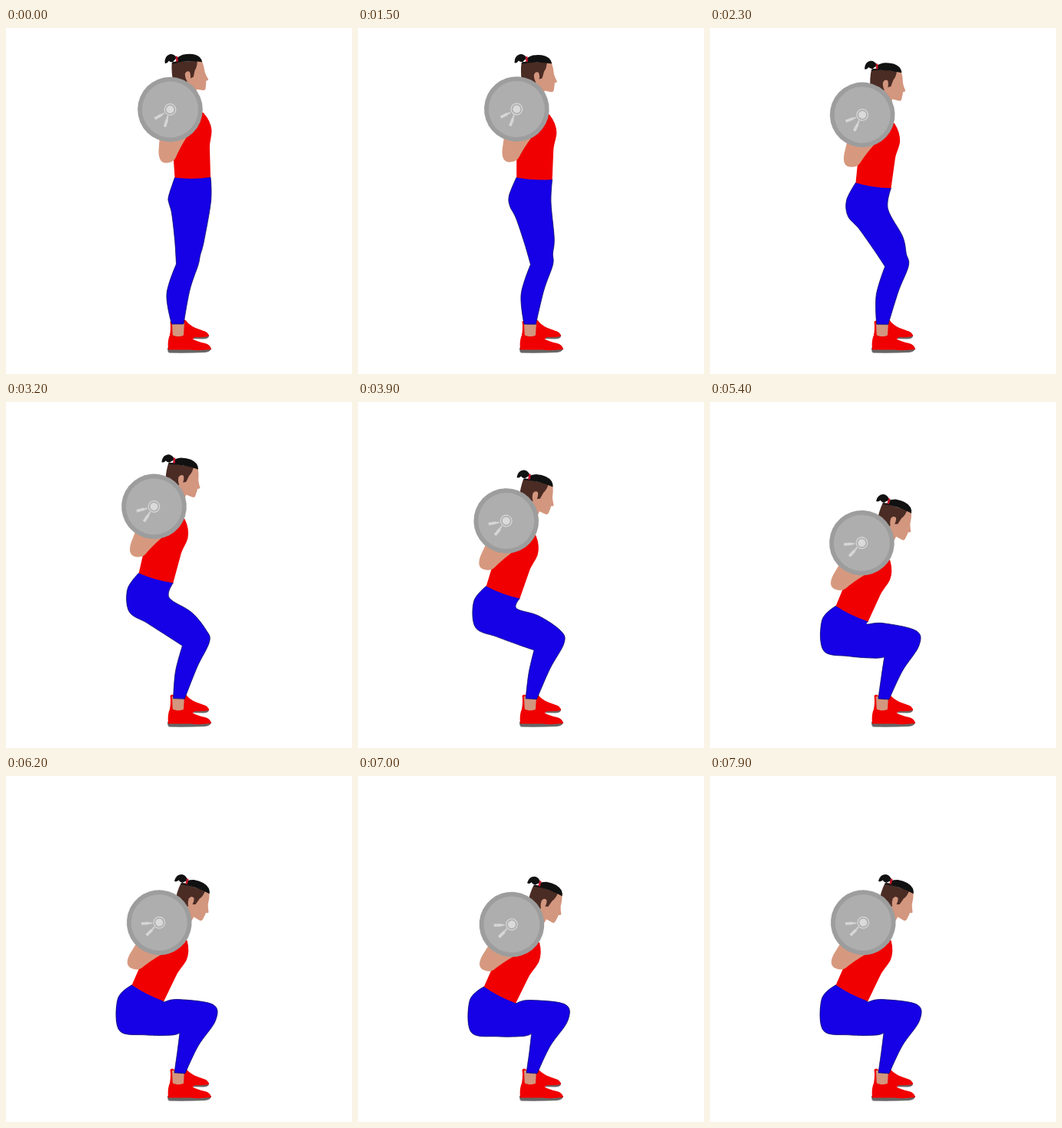
Animation of 450x450 px, one loop 8 s. Source, as an HTML page:

```html
<!DOCTYPE html>
<html lang="en">
<head>
<meta charset="utf-8">
<title>Barbell squat</title>
<style>
  html, body { margin: 0; width: 100%; height: 100%; overflow: hidden; background: #fff; }
  svg { display: block; width: 100vw; height: 100vh; }
</style>
</head>
<body>
<svg viewBox="0 0 450 450">
  <g id="feet">
    <path fill="#666" d="M236 399L264 399Q265 404 257 404.500L236 404Z"/>
    <path fill="#f00000" d="M213.500 382Q216 379 219 382L219 404L212 404Q215 392 213.500 382ZM230 379Q234 379 236 383Q241 388 249 391L260 395Q264 398 264 401Q255 403 246 402L242 405L230 404Z"/>
    <path fill="#d3967e" d="M216 383L232 383L231 399L236 404L217 404Z"/>
    <path fill="#666" d="M210 416L267 416Q267 421 259 422Q236 423 212 422.500Q210 421 210 416Z"/>
    <path fill="#f00000" d="M212 402Q214 398 218 400Q226 403 232 399Q237 400 242 404Q249 408 259 410Q266 412 267 418Q250 420 240 418.500L211 418.500Q210 409 212 402Z"/>
  </g>
  <path id="legs" fill="#1600e6" stroke="#0c0868" stroke-width=".8" stroke-linejoin="round"/>
  <g id="upper">
    <path fill="#f00000" d="M6 88.500Q28 91.500 52.500 88L51.500 52C51 42 54 36 54 27Q53 15 43 4L0 0Z"/>
    <g id="head">
      <path fill="#d3967e" d="M15 -12Q18 -5 19 3Q21 8 23.500 12Q23 14 20.500 14L20.500 18Q20 20 20 23Q20 27 15 26L8 25L6 40L-15 40L-15 0L0 -12Z"/>
      <path fill="#4a2c24" d="M-24 -10L9 -12Q9 -4 6 0L4 9L-1 11L-6 17L-22 17Q-25 2 -24 -10Z"/>
      <path fill="#d3967e" d="M-7 5Q-5 0 -1 2Q1 6 0 12L-2 17L-5 13Q-7 9 -7 5Z"/>
      <path fill="#111" d="M-24 -8Q-20 -16 -10 -20Q5 -23 12 -17Q15 -14 15.500 -10.500Q-5 -13 -24 -8ZM-17 -16Q-22 -22 -27 -20.500Q-34 -18 -33 -9Q-30 -8 -28 -12Q-25 -9 -17 -12Z"/>
      <path stroke="#c4142a" stroke-width="2.6" d="M-18 -18L-17 -11"/>
    </g>
    <path fill="#d6997f" d="M-13.500 33L-15 54Q-15 69.500 -5.500 69.500Q4 69 7 63Q12 51 22 35Z"/>
    <circle r="42.300" fill="#9d9d9d"/>
    <circle r="36.500" fill="#aeaeae"/>
    <g stroke="#d6d6d6" fill="none">
      <path stroke-width="2" d="M-8 5L-13 8M-3 8L-4.500 15"/>
      <path stroke-width="3.600" d="M-11.500 7L-20 12M-4 13L-7 22.500"/>
      <circle r="7.300" stroke-width="1.300"/>
    </g>
    <circle r="5" fill="#dadada"/>
  </g>
</svg>
<script>
const LOOP = 8000, STEP = 100, DEEPEST = 7050;
// Depth of the squat over time: 0 standing, 1 thighs level.
const depthKeys = [[0, 0], [1500, 0.145], [2300, 0.345], [3200, 0.61], [4600, 0.87], [6200, 1], [DEEPEST, 1.015]];

// Slope at a key, weighted by the neighbouring spans; the ends are at rest.
function slope(i) {
  if (i === 0 || i === depthKeys.length - 1) return 0;
  const [[t0, d0], [t1, d1], [t2, d2]] = depthKeys.slice(i - 1, i + 2);
  const a = t1 - t0, b = t2 - t1;
  return ((d1 - d0) / a * b + (d2 - d1) / b * a) / (a + b);
}

function depthAt(time) {
  const t = DEEPEST - Math.abs(time - DEEPEST);
  const j = depthKeys.findIndex(([end]) => end > 0 && t <= end), i = j - 1;
  const [[t0, d0], [t1, d1]] = [depthKeys[i], depthKeys[j]];
  const span = t1 - t0, s = (t - t0) / span, r = 1 - s;
  return d0 * (1 + 2 * s) * r * r + d1 * s * s * (3 - 2 * s)
    + span * s * r * (slope(i) * r - slope(j) * s);
}

const add = ([x, y], [dx, dy]) => [x + dx, y + dy];

function turn([x, y], degrees) {
  const a = degrees * Math.PI / 180, c = Math.cos(a), s = Math.sin(a);
  return [x * c - y * s, x * s + y * c];
}

const sharp = ([x, y]) => [x, y, true];

// Smooth closed outline that keeps sharp points as corners.
function outline(pts) {
  const n = pts.length;
  const at = i => pts[(i + n) % n].slice(0, 2);
  const handle = (i, sign) => pts[i][2] ? at(i)
    : at(i).map((c, k) => c + sign * (at(i + 1)[k] - at(i - 1)[k]) / 6);
  const curves = pts.map((_, i) => `C${handle(i, 1)} ${handle((i + 1) % n, -1)} ${at(i + 1)}`);
  return `M${at(0)}${curves.join("")}Z`;
}

const byId = id => document.getElementById(id);

function draw(time) {
  const d = depthAt(time), fold = d * d;
  const lean = 27.5 * d, swing = -83 * d;

  const knee = [235.5 + 14 * Math.sin(d * Math.PI / 2), 307 + 18 * fold];
  const onKnee = (x, y) => add(knee, [x, y]);
  const onThigh = (x, y) => add(knee, turn([x, y], swing));
  const hip = onThigh(4.5 * (1 - 0.055 * d), -87 * (1 - 0.055 * d));
  const stretch = 1 + 0.06 * d;
  const shoulder = add(hip, turn([-26.5 * stretch, -114 * stretch], lean));
  const onTorso = (x, y) => add(shoulder, turn([x, y], lean));

  byId("legs").setAttribute("d", outline([
    sharp(onTorso(6, 88.5)),
    onTorso(-2, 113),
    add(hip, turn([-28, 8], (lean + swing) / 2)),
    onThigh(-20, -66),
    onThigh(-16, -32),
    sharp(onKnee(-14 - 9.5 * fold, 9 * fold)),
    onKnee(-26.5, 39 - 6 * fold),
    sharp([215.5 + 3.5 * d, 385 + d]),
    sharp([231 + 2 * d, 385 + 2 * d]),
    onKnee(3.5 - 3 * d, 34 - 8 * fold),
    onKnee(14.5 + 8.5 * fold, 1 - 8 * fold),
    onThigh(17 + 13 * fold, -11 + 27 * fold),
    onThigh(22 + 9 * d, -30),
    onTorso(53, 119 - 30 * fold),
    sharp(onTorso(52.5, 88))
  ]));
  byId("upper").setAttribute("transform", `translate(${shoulder}) rotate(${lean})`);
  byId("head").setAttribute("transform", `translate(26.2 -51.3) rotate(${-0.2 * lean})`);
}

const start = performance.now();
function frame() {
  const t = (performance.now() - start) % LOOP;
  draw(Math.floor(t / STEP) * STEP);
  requestAnimationFrame(frame);
}
frame();
</script>
</body>
</html>
```
